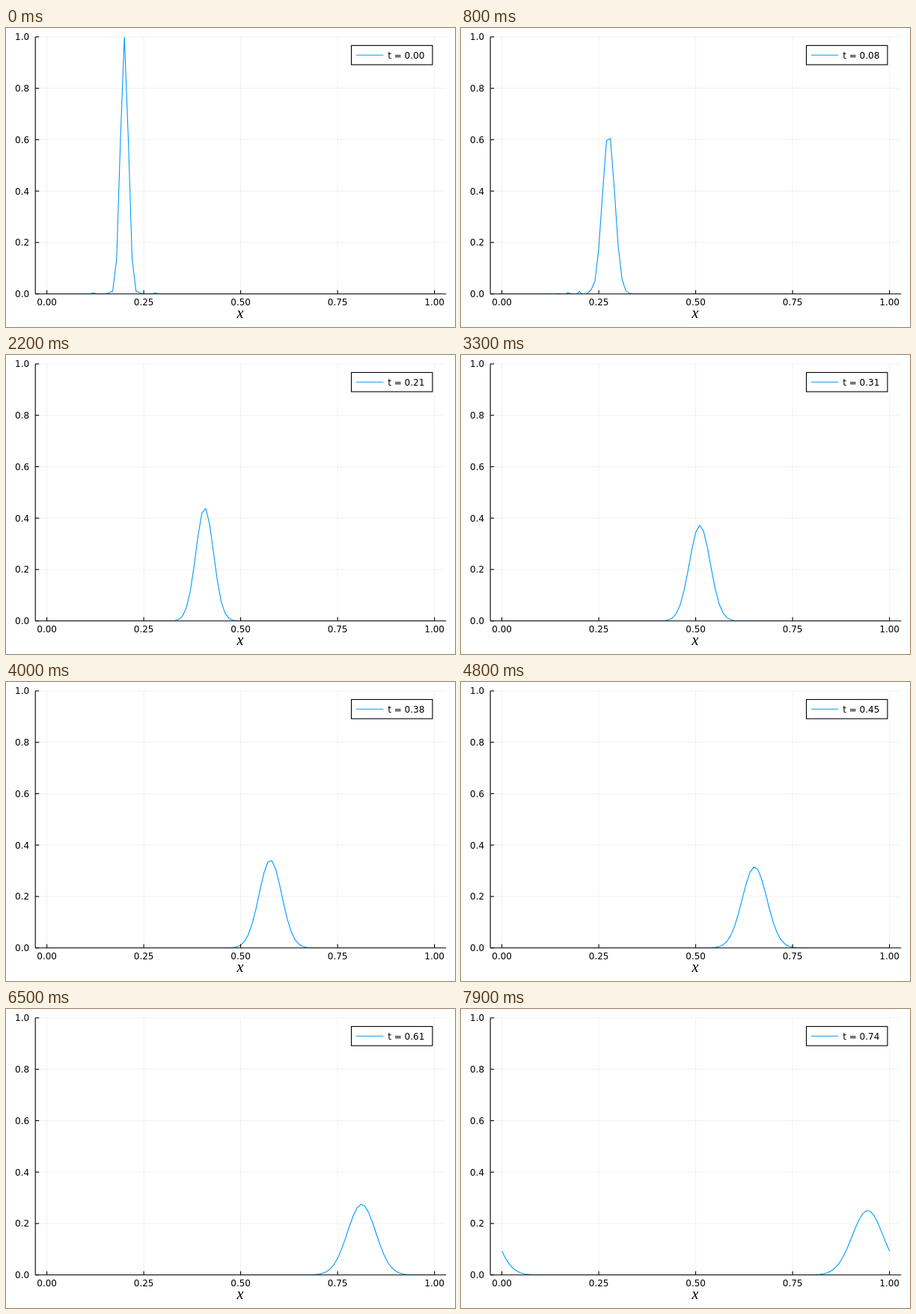
These frames come from a looping animation (600 px wide and 400 px high, 8000 ms). An HTML page with a canvas:

```html
<!DOCTYPE html>
<html lang="en">
<head>
<meta charset="utf-8">
<title>Drifting pulse</title>
<style>
  html, body { margin: 0; width: 100%; height: 100%; overflow: hidden; background: #fff; }
  canvas { display: block; }
</style>
</head>
<body>
<canvas id="plot" width="600" height="400"></canvas>
<script>
const ctx = document.getElementById('plot').getContext('2d');
const LOOP = 8000, STEP = 100, DT = 0.009415;
const LEFT = 39.2, RIGHT = 588.2, TOP = 11.9, BOTTOM = 355.7;
const BLUE = '#009afa';
const SANS = '12px "DejaVu Sans", sans-serif';
const px = x => 54.6 + 518 * x;
const py = y => BOTTOM - (BOTTOM - TOP) * y;

function line(x1, y1, x2, y2, color, width) {
  ctx.strokeStyle = color;
  ctx.lineWidth = width;
  ctx.beginPath();
  ctx.moveTo(x1, y1);
  ctx.lineTo(x2, y2);
  ctx.stroke();
}

function label(str, x, y, align, font = SANS) {
  ctx.font = font;
  ctx.textAlign = align;
  ctx.fillStyle = '#000';
  ctx.fillText(str, x, y);
}

const bell = (d, variance) => Math.exp(-d * d / (2 * variance));

// Gaussian carried at unit speed, spreading by diffusion on a periodic domain
function pulse(x, t) {
  const variance = 0.0001 + 0.002 * t;
  let d = x - 0.2 - t;
  d -= Math.round(d);
  return Math.sqrt(0.0001 / variance) * bell(d, variance);
}

// Short-lived numerical ripples left behind the pulse
function ripple(x, t) {
  const d = x - 0.2;
  const size = 0.065 * (1 - Math.exp(-60 * t)) * Math.exp(-25 * t);
  const wave = Math.cos(2 * Math.PI * (d - 0.49 * (t - 0.0753)) / 0.027);
  const side = Math.abs(d);
  const start = 0.004 * (bell(side - 0.08, 9e-6) + bell(side - 0.04, 9e-6));
  return size * wave * bell(d, 0.0009) + start * Math.exp(-200 * t);
}

function drawGrid() {
  const grid = 'rgba(0,0,0,0.1)';
  for (let i = 0; i <= 4; i++) line(px(i / 4), TOP, px(i / 4), BOTTOM, grid, 0.6);
  for (let i = 0; i <= 5; i++) line(LEFT, py(i / 5), RIGHT, py(i / 5), grid, 0.6);
}

function drawCurve(t) {
  ctx.save();
  ctx.beginPath();
  ctx.rect(LEFT, TOP, RIGHT - LEFT, BOTTOM - TOP);
  ctx.clip();
  ctx.beginPath();
  for (let i = 0; i <= 100; i++) {
    const x = i / 100;
    ctx.lineTo(px(x), py(pulse(x, t) + ripple(x, t)));
  }
  ctx.strokeStyle = BLUE;
  ctx.lineWidth = 1.1;
  ctx.lineJoin = 'round';
  ctx.stroke();
  ctx.restore();
}

function drawAxes() {
  line(LEFT, BOTTOM, RIGHT, BOTTOM, '#000', 1.1);
  line(LEFT, TOP, LEFT, BOTTOM, '#000', 1.1);
  for (let i = 0; i <= 4; i++) {
    const x = px(i / 4);
    line(x, BOTTOM, x, BOTTOM - 5, '#000', 1.1);
    label((i / 4).toFixed(2), x, 371.4, 'center');
  }
  for (let i = 0; i <= 5; i++) {
    const y = py(i / 5);
    line(LEFT, y, LEFT + 5, y, '#000', 1.1);
    label((i / 5).toFixed(1), 31.2, y + 4.4, 'right');
  }
  label('x', 313, 388, 'center', 'italic 20px "Liberation Serif", serif');
}

function drawLegend(t) {
  ctx.fillStyle = '#fff';
  ctx.fillRect(461.5, 23.4, 108.4, 25.7);
  ctx.strokeStyle = '#000';
  ctx.lineWidth = 1.1;
  ctx.strokeRect(461.5, 23.4, 108.4, 25.7);
  line(468, 36.3, 504.3, 36.3, BLUE, 1.1);
  label('t = ' + t.toFixed(2), 510.2, 40.8, 'left');
}

function draw(ms) {
  const t = Math.floor(ms % LOOP / STEP) * DT;
  ctx.fillStyle = '#fff';
  ctx.fillRect(0, 0, 600, 400);
  drawGrid();
  drawCurve(t);
  drawAxes();
  drawLegend(t);
}

const begin = performance.now();
function tick() {
  draw(performance.now() - begin);
  requestAnimationFrame(tick);
}
tick();
</script>
</body>
</html>
```
